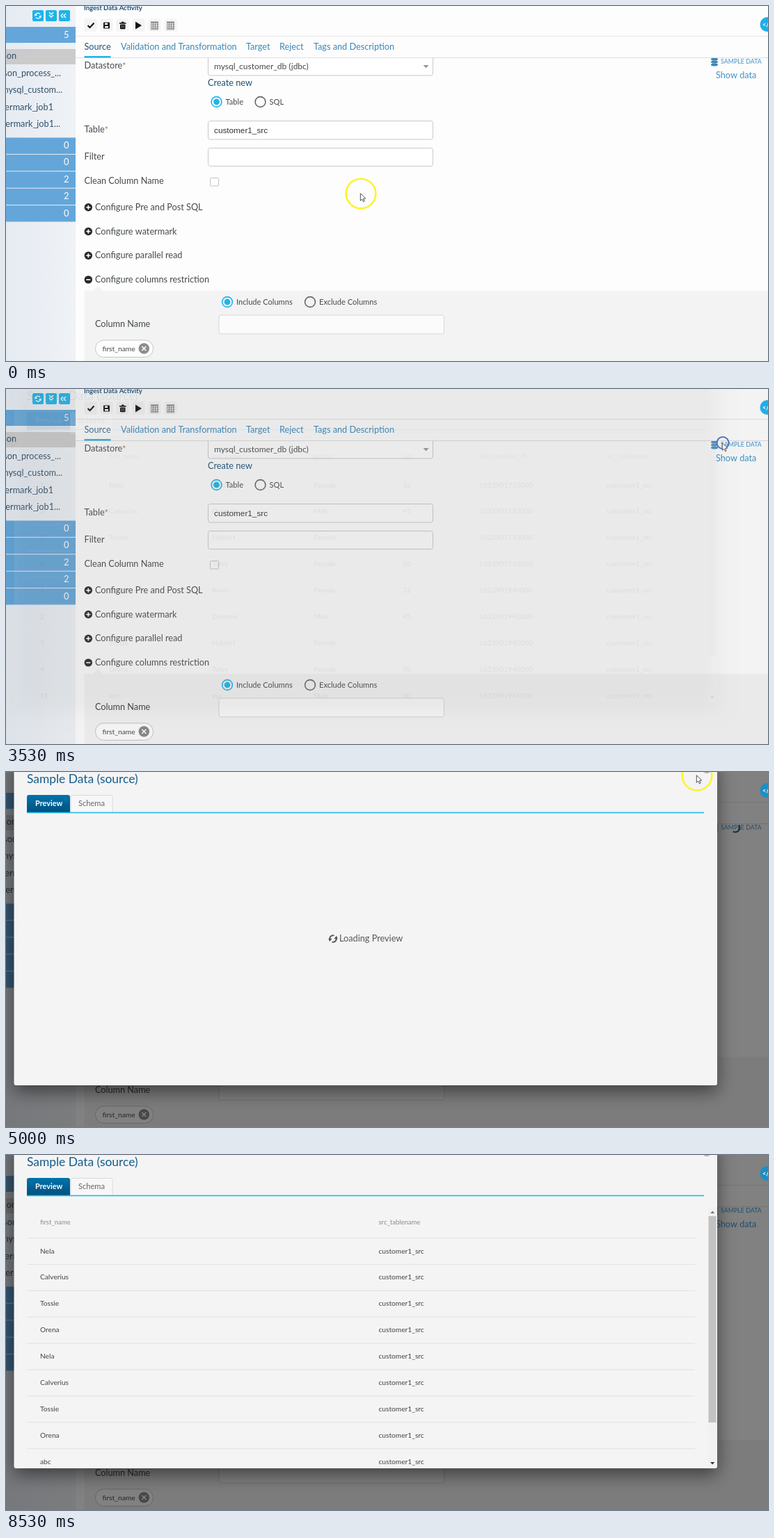
An HTML page with a canvas that plays this animation: 1095 px wide and 511 px high, repeating every 9.99 s.

```html
<!DOCTYPE html>
<html lang="en">
<head>
<meta charset="utf-8">
<title>Sample data preview</title>
<style>
html, body { margin: 0; height: 100%; overflow: hidden; background: #fdfdfd; }
canvas { display: block; }
</style>
</head>
<body>
<canvas id="stage" width="1095" height="511"></canvas>
<script>
const c = document.getElementById('stage').getContext('2d');
const LOOP = 9990, TAU = Math.PI * 2;
const INK = '#454a4e', LINK = '#3a87b9', NAVY = '#1b5078', CYAN = '#1fb4ea', BAR = '#64a6da';

const clamp = x => Math.max(0, Math.min(1, x));
const smooth = x => (x = clamp(x), x * x * (3 - 2 * x));

// Text is placed by the vertical centre of its capitals.
function text(s, x, y, size = 12.7, color = INK, { bold, align = 'left', family = 'Lato' } = {}) {
  c.font = `${bold ? 'bold ' : ''}${size}px ${family}, sans-serif`;
  c.textAlign = align;
  c.fillStyle = color;
  c.fillText(s, x, y + size * .35);
}
function rect(x, y, w, h, color) {
  c.fillStyle = color;
  c.fillRect(x, y, w, h);
}
function box(x, y, w, h, r, fill, stroke) {
  c.beginPath();
  c.roundRect(x, y, w, h, r);
  if (fill) { c.fillStyle = fill; c.fill(); }
  if (stroke) { c.strokeStyle = stroke; c.lineWidth = 1; c.stroke(); }
}
function disc(x, y, r, color) {
  c.beginPath();
  c.arc(x, y, r, 0, TAU);
  c.fillStyle = color;
  c.fill();
}
function ring(x, y, r, color, width, from = 0, to = TAU) {
  c.beginPath();
  c.arc(x, y, r, from, to);
  c.strokeStyle = color;
  c.lineWidth = width;
  c.stroke();
}
function line(color, width, ...p) {
  c.beginPath();
  for (let i = 0; i < p.length; i += 2) c.lineTo(p[i], p[i + 1]);
  c.strokeStyle = color;
  c.lineWidth = width;
  c.stroke();
}
function poly(color, ...p) {
  c.beginPath();
  for (let i = 0; i < p.length; i += 2) c.lineTo(p[i], p[i + 1]);
  c.fillStyle = color;
  c.fill();
}
function refresh(x, y, r, color, angle, width) {
  c.save();
  c.translate(x, y);
  c.rotate(angle);
  for (let i = 0; i < 2; i++) {
    ring(0, 0, r, color, width, .2, 2.5);
    poly(color, r * 1.35, -r * .1, r * 1.1, r * .85, r * .2, r * .2);
    c.rotate(Math.PI);
  }
  c.restore();
}
function radio(x, y, label, on) {
  ring(x, y, 7.4, on ? CYAN : '#63676a', 1.6);
  if (on) disc(x, y, 4.4, CYAN);
  text(label, x + 13, y, 11.1);
}

function sidebar() {
  const g = c.createLinearGradient(0, 0, 100, 0);
  g.addColorStop(0, '#e6ebf2');
  g.addColorStop(1, '#eff2f6');
  rect(0, 0, 100, 511, g);
  for (const x of [38, 57, 76]) box(x, 6, 16, 16, 2, CYAN);
  refresh(46, 14, 3.8, '#fff', 0, 1.3);
  for (const d of [-3, 1]) {
    line('#fff', 1.4, 62, 12 + d, 65, 15 + d, 68, 12 + d);
    line('#fff', 1.4, 85 + d, 11, 82 + d, 14, 85 + d, 17);
  }
  const right = { align: 'right' };
  rect(0, 30, 100, 23, BAR);
  text('5', 90.5, 41, 13, '#fff', right);
  rect(0, 62, 100, 22, '#cbcbcb');
  [['json', 15], ['json_process_...', 79], ['mysql_custom...', 81], ['watermark_job1', 68], ['watermark_job1...', 78]]
    .forEach(([s, x], i) => text(s, x, 72 + i * 24.5, 12.7, '#31506b', right));
  ['0', '0', '2', '2', '0'].forEach((s, i) => {
    rect(0, 189.5 + i * 24.4, 100, 23.4, BAR);
    text(s, 90.5, 200 + i * 24.5, 13, '#fff', right);
  });
}

function toolbar() {
  rect(100, 0, 995, 75, '#fdfdfd');
  text('Ingest Data Activity', 112, 2.5, 9.5, NAVY, { bold: true });
  for (let i = 0; i < 6; i++) box(112.5 + i * 23, 18.5, 18, 18, 2, '#f4f4f4');
  line('#111', 2, 117.5, 28, 120.5, 31, 126.5, 24.5);
  box(140, 23.5, 9, 9, 1, '#111');
  rect(142, 24.5, 4, 2.5, '#fff');
  rect(142, 29, 5, 2.5, '#fff');
  rect(163, 24, 9.5, 1.6, '#111');
  rect(166, 22.6, 3.5, 1.5, '#111');
  box(164, 26.5, 7.5, 6.8, 1, '#111');
  for (const x of [166, 168.7]) rect(x, 27.7, .8, 4, '#aaa');
  poly('#111', 186, 22.5, 195, 28, 186, 33.5);
  for (const x of [208, 231]) {
    rect(x, 22.5, 11, 11, '#777');
    for (let i = 1; i < 11; i += 3.2) {
      rect(x + i, 24.5, 1.4, 8, '#e8e8e8');
      rect(x, 23.3 + i, 11, 1, '#d2d2d2');
    }
  }
  rect(100, 43, 995, 1, '#e4e4e4');
  [['Source', 112.5], ['Validation and Transformation', 165], ['Target', 345], ['Reject', 393], ['Tags and Description', 442]]
    .forEach(([s, x], i) => text(s, x, 59, 12.7, i ? LINK : NAVY));
  rect(100, 74, 995, 1, '#dedede');
  rect(112.5, 72, 38, 2.5, CYAN);
}

function form(loading) {
  const border = '#c9c9c9', star = '#9c8640';
  text('Datastore', 112.5, 86);
  text('*', 167, 86, 13, star);
  box(290.5, 60.5, 323, 39.5, 3, '#fff', border);
  text('mysql_customer_db (jdbc)', 299, 86.5, 12);
  poly('#999', 599.5, 85, 607.5, 85, 603.5, 89.5);
  text('Create new', 290, 111, 12.7, NAVY);
  radio(302.5, 138, 'Table', true);
  radio(365.5, 138, 'SQL');
  text('Table', 112.5, 178);
  text('*', 141.5, 178, 13, star);
  box(290.5, 165.5, 323, 26.5, 3, '#fff', border);
  text('customer1_src', 299, 178.5, 11.75, '#333', { family: 'Liberation Sans' });
  text('Filter', 112.5, 217);
  box(290.5, 204.5, 323, 26, 3, '#fff', border);
  text('Clean Column Name', 112.5, 252);
  box(293.5, 247.5, 12, 11.5, 1, '#fff', '#c4c4c4');
  ['Pre and Post SQL', 'watermark', 'parallel read', 'columns restriction'].forEach((s, i) => {
    const y = 289.5 + i * 34.7;
    disc(118.3, y + .3, 5.7, '#26292b');
    rect(115.3, y - .5, 6, 1.6, '#fff');
    if (i < 3) rect(117.5, y - 2.7, 1.6, 6, '#fff');
    text('Configure ' + s, 128, y);
  });
  rect(112.5, 410, 983, 101, '#f3f3f3');
  poly('#f3f3f3', 125, 410, 132, 403, 139, 410);
  radio(318, 426, 'Include Columns', true);
  radio(437, 426, 'Exclude Columns');
  text('Column Name', 128, 458);
  box(306, 445, 323.5, 27, 3, '#fbfbfb', '#d6d6d6');
  box(128.5, 481, 83, 24.5, 12, '#fdfdfd', '#c6c6c6');
  text('first_name', 138.5, 493, 10.3);
  disc(198.3, 493, 7.8, '#8d8d8d');
  line('#fff', 1.6, 195.3, 490, 201.3, 496);
  line('#fff', 1.6, 201.3, 490, 195.3, 496);

  for (const y of [77, 81, 85]) {
    c.beginPath();
    c.ellipse(1018, y - .5, 5, 2, 0, 0, TAU);
    c.fillStyle = LINK;
    c.fill();
  }
  text('SAMPLE DATA', 1027, 80, 8.9, '#4095cb');
  if (!loading) text('Show data', 1020, 100, 12.7, '#4095cb');
}

const people = [
  ['Nela', 'Borin', 'Female', 32], ['Calverius', 'Dremms', 'Male', 45],
  ['Tossie', 'Haldert', 'Female', ''], ['Orena', 'Tolvy', 'Female', 50],
];
const rows = [];
for (const stamp of ['1623901733000', '1623901940000'])
  people.forEach((p, i) => rows.push([i + 1, ...p, stamp, 'customer1_src']));
rows.push([11, 'abc', 'xyz', 'Male', 40, '1623901941000', 'customer1_src']);
const heads = ['id', 'first_name', 'last_name', 'gender', 'age', 'last_modified_dt', 'src_tablename'];
const fullColumns = [[0, 49], [1, 148], [2, 296], [3, 442], [4, 570], [5, 680], [6, 863]];
const shortColumns = [[1, 49], [6, 535.5]];

function table(columns) {
  for (const [k, x] of columns) {
    text(heads[k], x, 97, 9.5, '#8b8b8b');
    rows.forEach((r, i) => text(r[k], x, 138 + i * 37.87, 10.2, '#444'));
  }
  for (let i = 0; i < 9; i++) rect(30, 119 + i * 37.9, 960, 1, '#e2e2e2');
  rect(1009, 76, 12, 374, '#f1f1f1');
  rect(1009.5, 88, 11, 297, '#c2c2c2');
  poly('#777', 1012.3, 84, 1015.3, 80.5, 1018.3, 84);
  poly('#333', 1012, 442, 1018.4, 442, 1015.2, 445.5);
}

function modal(t, loading) {
  c.save();
  c.shadowColor = 'rgba(0,0,0,.5)';
  c.shadowBlur = 26;
  c.shadowOffsetY = 9;
  box(11.5, -20, 1010.5, 471, 3, '#f4f4f4');
  c.restore();
  disc(1007, -5, 7, '#b3b3b3');
  text('Sample Data (source)', 30, 9.5, 17.4, '#155d8b');
  box(93, 33.5, 60, 30, [3, 3, 0, 0], '#f7f7f7', '#dadada');
  rect(92, 58, 63, 8, '#f4f4f4');
  const g = c.createLinearGradient(0, 33, 0, 58);
  g.addColorStop(0, '#0074ad');
  g.addColorStop(1, '#00507f');
  box(30, 33, 62, 25, [3, 3, 0, 0], g);
  text('Preview', 42, 45.5, 10.9, '#fff', { bold: true });
  text('Schema', 104, 45.5, 11.1, '#666');
  rect(30, 57.7, 973, 1.6, '#22b8ea');
  if (loading) {
    refresh(470, 240, 4.8, '#555', (t - 7200) / 2000 * TAU, 2);
    text('Loading Preview', 479, 240, 12.7, '#555');
  } else {
    table(t < 5000 ? fullColumns : shortColumns);
  }
}

// Pointer positions: time, x, y
const path = [
  [0, 510, 270], [399, 510, 270], [400, 522, 291], [530, 650, 304], [665, 776, 290], [730, 851, 274],
  [1129, 851, 274], [1130, 1008, 135], [1270, 1020, 138], [1400, 1070, 141], [1530, 1066, 135],
  [1860, 1064, 134], [2070, 926, 131], [2200, 918, 126], [2730, 1012, 94], [2860, 1012, 94],
  [3270, 1030, 78], [4500, 1030, 78], [4930, 993, 5], [5250, 993, 5], [5530, 985, -40], [LOOP, 985, -40],
];
function pointer(t) {
  const i = path.findIndex(p => p[0] > t);
  const [a, b] = [path[i - 1], path[i]];
  const k = (t - a[0]) / (b[0] - a[0]);
  const x = a[1] + (b[1] - a[1]) * k, y = a[2] + (b[2] - a[2]) * k;
  if (t < 3330 || t >= 4270) {
    ring(x, y, 21.3, '#fbf42c', 2.6);
  } else if (t < 4130) {
    c.globalAlpha = 1 - .6 * clamp((t - 4040) / 90);
    ring(x, y - .5, 8.5, '#4d78c0', 2);
    c.globalAlpha = 1;
  }
  c.save();
  c.translate(x - .7, y - .3);
  c.beginPath();
  for (const [px, py] of [[0, 0], [0, 10.5], [2.4, 8.4], [4.2, 12], [5.8, 11.2], [4.2, 7.7], [7.4, 7.4]]) c.lineTo(px, py);
  c.closePath();
  c.fillStyle = '#fff';
  c.fill();
  c.strokeStyle = '#3c3c3c';
  c.lineWidth = .9;
  c.stroke();
  c.restore();
}

function draw(t) {
  const loading = t >= 4270 && t < 7600;
  const shown = smooth((t - 3490) / 230);
  rect(0, 0, 1095, 511, '#fdfdfd');
  form(loading);
  sidebar();
  toolbar();
  if (loading && t < 6670) {
    const a = (t - 5000) / 1000 * TAU - .6;
    ring(1048, 80, 6.5, '#2d5375', 2, a, a + 2.7);
  }
  rect(0, 0, 1095, 511, `rgba(0,0,0,${.49 * shown})`);
  disc(1094, 26.5, 10.5, shown > .5 ? '#1b8fc6' : '#20aee8');
  text('</', 1087, 26.5, 9, '#fff', { bold: true });
  if (shown) {
    c.globalAlpha = shown;
    modal(t, loading);
    c.globalAlpha = 1;
  }
  pointer(t);
}

function tick() {
  draw(performance.now() % LOOP);
  requestAnimationFrame(tick);
}
tick();
</script>
</body>
</html>
```
